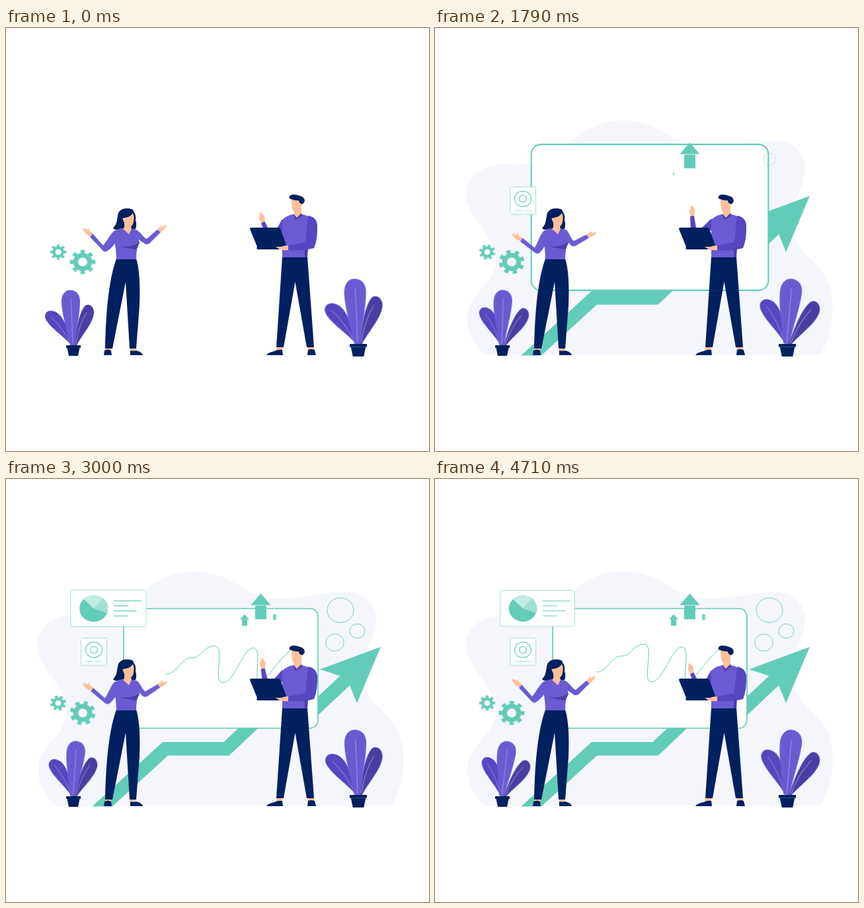
An HTML page without scripts for the animation above (4.78 s loop, 640 by 640 pixels).

```html
<!DOCTYPE html>
<html lang="en">
<head>
<meta charset="utf-8">
<title>Growth presentation</title>
<style>
  @property --t { syntax: '<number>'; inherits: true; initial-value: 0; }
  html, body { margin: 0; width: 100%; height: 100%; overflow: hidden; background: #fff; }
  svg {
    display: block; width: 100%; height: 100%;
    --teal: #63ccb9; --violet: #6a5bd3; --plum: #5646bf; --dusk: #4b3ea3;
    --navy: #002060; --skin: #fec09a;
    animation: clock 4780ms linear infinite;
  }
  @keyframes clock { to { --t: 4780; } }

  .teal { fill: var(--teal); } .violet { fill: var(--violet); } .plum { fill: var(--plum); }
  .dusk { fill: var(--dusk); } .navy { fill: var(--navy); } .skin { fill: var(--skin); }
  .line { fill: none; stroke: var(--teal); }
  .card { fill: #fff; stroke: #a5e0d5; }
  .vein { fill: none; stroke: #b1a8ea; stroke-width: .7; }

  /* Grows from --s (ms) past full size, then settles at 1 */
  .pop {
    --over: 1.25;
    --u: calc(var(--t) - var(--s));
    --size: min(max(0, var(--u) / 472), max(1, var(--over) - (var(--u) - 590) / 600));
    transform: scale(var(--size));
  }
  .rise { transform: scaleY(var(--size)); }

  .move { animation: 4780ms ease-in-out infinite; }
  .blob { animation-name: appear; }
  .growth { animation-name: grow; animation-timing-function: linear; }
  .curve { animation-name: trace, wave; }
  .turn { animation-name: turn; animation-timing-function: linear; }
  .back { animation-direction: reverse; }
  .draw { stroke-dasharray: 1; }

  @keyframes appear { 0%, 1.5% { opacity: 0; } 14%, 100% { opacity: 1; } }
  @keyframes grow { 0%, 1.5% { stroke-dashoffset: 1; } 16.7%, 100% { stroke-dashoffset: 0; } }
  @keyframes trace { 0%, 38.9% { stroke-dashoffset: 1; visibility: hidden; } 39% { visibility: visible; } 48.7%, 100% { stroke-dashoffset: 0; } }
  @keyframes turn { to { transform: rotate(45deg); } }
  @keyframes wave {
    0%, 46%, 74.7% { d: path("M216 339C232 340 240 315 256 314C274 313 280 294 298 294C316 294 318 328 336 328C354 328 360 281 379 281C396 281 396 308 410 308C430 308 438 270 460 270"); }
    60.3%, 94.5%, 100% { d: path("M244 292C258 294 268 268 280 268C296 270 300 249 317 250C333 252 312 307 327 307C346 307 358 254 374 254C386 255 376 290 379 306C385 316 412 270 430 258"); }
  }

  @keyframes leafA { 0% { animation-timing-function: ease-in; } 28.9% { transform: rotate(14deg); } 50.8% { transform: none; } 74.7%, 100% { transform: rotate(14deg); } }
  @keyframes leafB { 0% { animation-timing-function: ease-in; } 26% { transform: rotate(8.5deg); } 45% { transform: rotate(2deg); } 74.7%, 100% { transform: rotate(9deg); } }
  @keyframes leafC { 0% { animation-timing-function: ease-in; } 31.8% { transform: rotate(13deg); } 50.5% { transform: rotate(1.5deg); } 79%, 100% { transform: rotate(13.5deg); } }
  @keyframes leafD { 0% { animation-timing-function: ease-in; } 31% { transform: rotate(11deg); } 57.3% { transform: none; } 85%, 100% { transform: rotate(11.5deg); } }
  @keyframes leafE { 0% { animation-timing-function: ease-in; } 37% { transform: rotate(7.5deg); } 59.6% { transform: none; } 83.7%, 100% { transform: rotate(7.5deg); } }
  @keyframes leafF { 0% { animation-timing-function: ease-in; } 36.3% { transform: rotate(13deg); } 62% { transform: none; } 92%, 100% { transform: rotate(13deg); } }

  /* Whole arms swing about the shoulder */
  .arm { animation-name: swing; }
  @keyframes swing {
    0%, 50.8%, 95.6%, 100% { transform: rotate(var(--from, 0deg)); }
    28.9%, 74.7% { transform: rotate(var(--to, 0deg)); }
  }
</style>
</head>
<body>
<svg viewBox="0 0 640 640" xmlns="http://www.w3.org/2000/svg">
  <defs>
    <clipPath id="ground"><path d="M0 0H640V495.500H0Z"/></clipPath>
    <g id="leaf-left">
      <path class="plum" d="M-3 0C-14 -14 -41 -30 -43 -43C-43 -50 -38 -53 -32 -52C-16 -50 -8 -25 -1 0Z"/>
      <path class="vein" d="M-4 -2Q-16 -26 -34 -43"/>
    </g>
    <g id="leaf-mid">
      <path class="violet" d="M-5 0C-10 -25 -19 -52 -18 -69C-17 -79 -11 -83.500 -5 -83.500C4 -83.500 10 -77 10 -67C10 -45 4 -22 3 0Z"/>
      <path class="vein" d="M-1 -2Q-2 -38 -4 -71"/>
    </g>
    <g id="leaf-right">
      <path class="dusk" d="M2 0C4 -20 8 -50 18 -60C24 -64 32 -58 31 -48C29 -32 13 -16 5 0Z"/>
      <path class="vein" d="M4 -2Q8 -30 20 -50"/>
    </g>
    <g id="pot" class="navy"><path d="M-11 0H11V4H-11Z"/><path d="M-9.500 4H9.500L7 16H-7Z"/></g>
    <path id="up" class="teal" d="M0 -39L15 -21.500H-15ZM-8.500 -20.800H8.500V0H-8.500Z"/>
    <g id="gear" class="line">
      <circle r="10.700" stroke-width="7.400"/>
      <circle r="16.300" stroke-width="6" pathLength="8" stroke-dasharray=".5" stroke-dashoffset=".25"/>
    </g>
  </defs>

  <path class="move blob" fill="#f5f6fc" d="M77 495C50 475 42 440 55 415C66 395 92 380 92 350C90 310 48 290 47 250C47 225 70 206 108 206C125 207 140 208 160 202C195 190 220 140 285 140C345 140 360 180 410 181C450 181 480 170 518 171C545 172 562 195 560 215C557 250 538 260 538 290C538 335 575 350 590 375C608 405 605 460 583 494Z"/>

  <!-- Growth arrow -->
  <g clip-path="url(#ground)">
    <path class="line draw move growth" stroke-width="20.600" pathLength="1" d="M130 509.800L241 408.200H333.500L392 352.700H462L516 302"/>
  </g>
  <path class="teal pop" style="--s:745;transform-origin:526px 291px" d="M567 254L531 339L520 312L506 298L475 288Z"/>

  <!-- Board -->
  <rect class="pop" style="--s:1183;transform-origin:325px 286.500px" x="178" y="196" width="294" height="181" rx="12" fill="#fff" stroke="#63ccb9" stroke-width="1.700"/>
  <path class="line draw move curve" pathLength="1" stroke-width="1" d="M216 339"/>

  <!-- Bubbles -->
  <g class="line" stroke-width=".9">
    <g transform="translate(506 198.500)"><ellipse class="pop" style="--s:1565" rx="20" ry="18.700"/></g>
    <g transform="translate(497.500 247.500)"><ellipse class="pop" style="--s:1800" rx="13.800" ry="13"/></g>
    <g transform="translate(531.500 230)"><ellipse class="pop" style="--s:2205" rx="11.500" ry="10.800"/></g>
  </g>

  <!-- Cards -->
  <g class="pop" style="--s:1160;--over:1;transform-origin:133px 261px">
    <rect class="card" x="113.500" y="240.500" width="39" height="41.500" rx="2"/>
    <g class="line">
      <ellipse cx="133" cy="258.500" rx="12.500" ry="11.700" stroke-width="1.200"/>
      <ellipse cx="133" cy="258.500" rx="5.500" ry="5.200" stroke-width="1.200"/>
      <path d="M120 276H132M134 276H146" opacity=".6"/>
    </g>
  </g>
  <g class="pop" style="--s:2270;transform-origin:155px 196px">
    <rect class="card" x="98.700" y="168.500" width="112.600" height="54.500" rx="4"/>
    <ellipse class="teal" cx="133" cy="196" rx="21.200" ry="19.700"/>
    <path fill="#c1ebe3" d="M133 196L118 182A21.200 19.700 0 0 1 147 181Z"/>
    <path fill="#a1e0d3" d="M133 196L147 181A21.200 19.700 0 0 1 153 203Z"/>
    <path class="line" stroke-width="1.200" d="M163 184.500H204M163 192H185M163 199.500H197M163 207H185"/>
  </g>

  <!-- Upward arrows -->
  <g transform="translate(385.500 212.300)"><use class="pop rise" style="--s:1050" href="#up"/></g>
  <g transform="translate(361 222) scale(.47 .44)"><use class="pop" style="--s:1690" href="#up"/></g>
  <g transform="translate(406.500 213) scale(.24)"><use class="pop" style="--s:1800" href="#up"/></g>

  <!-- Gears -->
  <g transform="translate(116 354) scale(1 .95)"><use class="move turn back" href="#gear"/></g>
  <g transform="translate(79 339) scale(.63 .6)"><use class="move turn" href="#gear"/></g>

  <!-- Plants -->
  <g transform="translate(102 480)">
    <use class="move" style="animation-name:leafA" href="#leaf-left"/>
    <use class="move" style="animation-name:leafC" href="#leaf-right"/>
    <use class="move" style="animation-name:leafB" href="#leaf-mid"/>
    <use href="#pot"/>
  </g>
  <g transform="translate(533 478) scale(1.180)">
    <use class="move" style="animation-name:leafD" href="#leaf-left"/>
    <use class="move" style="animation-name:leafF" href="#leaf-right"/>
    <use class="move" style="animation-name:leafE" href="#leaf-mid"/>
    <use href="#pot"/>
  </g>

  <!-- Woman -->
  <g>
    <path class="navy" d="M170 282C172 274 180 272 188 274C196 278 197 285 196 291C198 296 197 301 196 304C190 306 186 304 182 304H172C168 306 164 305 162 303C165 299 168 296 168 290Z"/>
    <path class="skin" d="M150 484H159V489H150ZM188 484H196V490H188Z"/>
    <path class="navy" d="M167 349H197C203 367 203 400 202 420L197 485H187L181 384L161 485H150C151 440 154 385 167 349ZM149 488Q154 485 159 488L160 495H148ZM188 488Q193 489 197 488Q206 490 207 495H188Z"/>
    <path class="violet" d="M170 304Q183 301 197 305L202 325Q197 332 197 350H167Q167 334 163 318Z"/>
    <path class="dusk" d="M169 330Q190 333 202 324Q200 331 196 335Q184 333 169 330Z"/>
    <path class="skin" d="M179 295H188L190 304L186 312L177 304Q180 302 179 295Z"/>
    <path class="skin" d="M176 286Q186 287 191 279Q195 283 193 293Q192 301 186 300Q178 298 176 286Z"/>
    <path class="navy" d="M169 284C170 274 180 272 188 273.500C193 274 194 277 192 280C188 286 182 287 175 288C177 296 175 303 168 305C164 305 162 304 163 302C167 298 168 292 169 284Z"/>
    <g class="move arm" style="--to:-14deg;transform-origin:170px 308px">
      <path class="violet" d="M170 305C160 305 156 319 147 329L131 311L127 316L144 334Q149 341 154 337Q160 333 168 322Z"/>
      <path class="skin" d="M131 311L127 315C121 313 118 307 116 303C119 302 122 304 123 306C124 303 127 302 126 306Z"/>
    </g>
    <g class="move arm" style="--to:21deg;transform-origin:199px 309px">
      <path class="violet" d="M196 305C203 307 207 317 213 319L229 305L234 309L217 326Q212 329 208 325L198 318Z"/>
      <path class="skin" d="M229 305L234 309C239 305 242 302 243 298C240 298 238 300 236 302C237 298 234 297 234 300Z"/>
    </g>
  </g>

  <!-- Man -->
  <g>
    <g class="move arm" style="--from:-24deg;transform-origin:422px 290px">
      <path class="plum" d="M387 280H393L394 306L418 288L424 298L397 320Q386 324 384 312Z"/>
      <path class="skin" d="M388 280C386 273 387 268 389 270C390 264 392 263 393 266C396 268 396 274 393 280Z"/>
    </g>
    <path class="skin" d="M409 481H418V488H409ZM457 481H466V488H457Z"/>
    <path class="navy" d="M418 346H456L466 483H455L437.500 384L420 483H409ZM394 495Q396 491 406 489Q412 486 418 487L419 495ZM457 487Q462 485 467 487L469 495H456Z"/>
    <path class="violet" d="M418 290Q426 282 440 281Q456 282 461 288L456 347H418Z"/>
    <path class="plum" d="M457 284C468 285 472 294 471 303C471 317 469 326 466 333Q447 338 427 336V329L453 324Z"/>
    <path class="dusk" d="M452 334L456 335V347H452Z"/>
    <path class="skin" d="M436 270H447V281L440 289L436 284Z"/>
    <path class="skin" d="M432 260Q441 257 447 263Q451 265 447 269Q446 279 438 279Q432 279 432 260Z"/>
    <path class="dusk" d="M435 281L440 287L447 280L448 284L438 291Z"/>
    <path class="navy" d="M429 258C427 252 435 250 445 254Q452 256 452 262Q450 267 447 266Q443 265 443 261Q435 261 429 258Z"/>
    <path class="navy" d="M371 302H412Q414 302 415 304L425 331Q425 333 423 333L411 335H381Q378 334 380 331L369 304Q369 302 371 302Z"/>
    <path class="skin" d="M427 329V336Q418 337 413 334Q409 332 408 331L416 331Q421 329 427 329Z"/>
  </g>
</svg>
</body>
</html>
```
